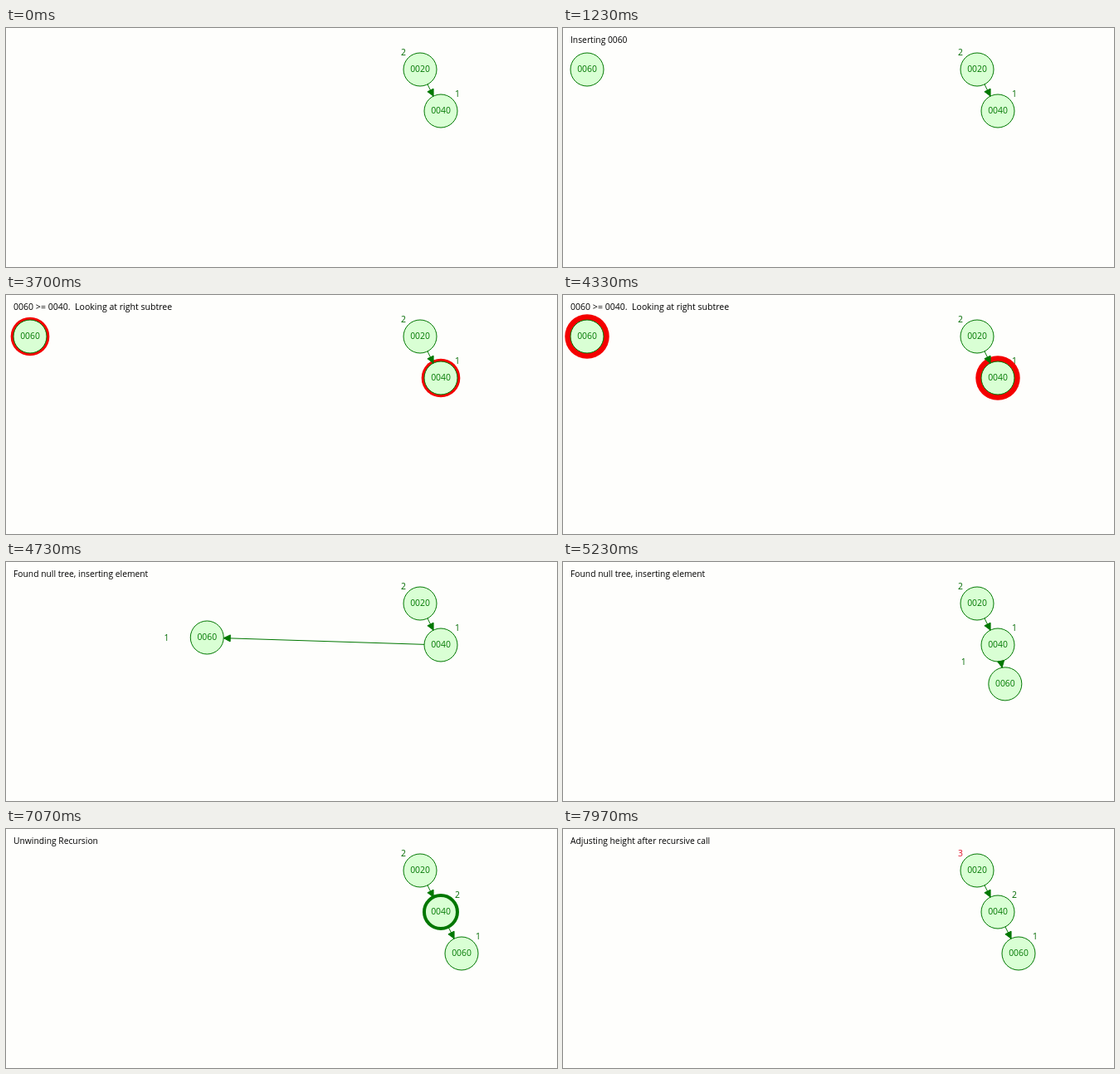
An HTML page for the animation above (8 s loop, 664x288 px).

```html
<!DOCTYPE html>
<html lang="en">
<head>
<meta charset="utf-8">
<title>AVL tree insertion</title>
<style>
  html, body { margin: 0; width: 664px; height: 288px; overflow: hidden; background: #fefefc; }
  svg { display: block; }
  text { font-family: "Open Sans", "Noto Sans", sans-serif; font-size: 10.4px; white-space: pre; }
  .node circle { fill: #d9ffd4; stroke: #007700; }
  .node .glow { fill: #f40000; stroke: none; }
  .node text { fill: #007700; text-anchor: middle; }
  .height { fill: #006a00; text-anchor: middle; }
  .height.changed { fill: #e0102a; }
  .edge { fill: #007700; stroke: #007700; }
  #ring { fill: none; stroke: #007700; stroke-width: 4; }
</style>
</head>
<body>
<svg id="stage" width="664" height="288" viewBox="0 0 664 288"></svg>
<script>
const LOOP = 8000;
const CREATED = 1200;
const START = 2000;   // first comparison
const BLOCK = 845;    // length of one animation step
const RADIUS = 20;
const PULSE = 470;

// One entry per step: message, highlighted node, ring path, changed height.
const steps = [
  { text: "0060 >= 0020.  Looking at right subtree", size: 10.55, glow: "n20" },
  { text: "0060 >= 0020.  Looking at right subtree", size: 10.55, ring: ["n20", "n40"] },
  { text: "0060 >= 0040.  Looking at right subtree", size: 10.55, glow: "n40" },
  { text: "Found null tree, inserting element" },
  { text: "Unwinding Recursion", ring: ["n60", "n40"] },
  { text: "Adjusting height after recursive call", changed: "h40" },
  { text: "Unwinding Recursion", ring: ["n40", "n20"] },
  { text: "Adjusting height after recursive call", changed: "h20" }
];
const INSERT = 3, GROW_40 = 5, GROW_20 = 7;

const spots = { n20: [499, 50], n40: [524, 100], n60: [549, 150] };
const entry = [29, 50];
const labelEntry = [80, 80];
const labelEnd = [569, 129.5];

const stage = document.getElementById("stage");

function add(tag, attrs, parent = stage) {
  const el = document.createElementNS("http://www.w3.org/2000/svg", tag);
  set(el, attrs);
  parent.append(el);
  return el;
}
function set(el, attrs) {
  for (const key in attrs) el.setAttribute(key, attrs[key]);
}
function show(el, on) {
  el.style.display = on ? "" : "none";
}
function write(el, text) {
  if (el.textContent !== text) el.textContent = text;
}
function mix(a, b, p) {
  return a.map((v, i) => v + (b[i] - v) * p);
}

function makeNode(key) {
  const group = add("g", { class: "node" });
  const glow = add("circle", { class: "glow" }, group);
  add("circle", { r: RADIUS }, group);
  add("text", { y: 3.4 }, group).textContent = "00" + key.slice(1);
  return { group, glow };
}
function makeHeight(x, y) {
  return add("text", { class: "height", x, y: y + 3.7 });
}
function makeEdge() {
  const group = add("g", { class: "edge" });
  return { group, line: add("line", {}, group), head: add("path", {}, group) };
}

function placeEdge(edge, from, to) {
  const dx = to[0] - from[0], dy = to[1] - from[1];
  const len = Math.hypot(dx, dy) || 1;
  const ux = dx / len, uy = dy / len;
  const tip = [to[0] - ux * RADIUS, to[1] - uy * RADIUS];
  const base = [tip[0] - ux * 8, tip[1] - uy * 8];
  set(edge.line, {
    x1: from[0] + ux * RADIUS, y1: from[1] + uy * RADIUS, x2: tip[0], y2: tip[1]
  });
  set(edge.head, {
    d: `M${tip}L${base[0] - uy * 4},${base[1] + ux * 4}L${base[0] + uy * 4},${base[1] - ux * 4}Z`
  });
}

const message = add("text", { x: 9, y: 18.1 });
const heights = {
  h20: makeHeight(479, 29.5),
  h40: makeHeight(544, 79.5),
  h60: makeHeight(0, 0)
};
const nodes = {};
for (const key in spots) nodes[key] = makeNode(key);
const ring = add("circle", { id: "ring", r: RADIUS });
const edges = [makeEdge(), makeEdge()];

function draw(t) {
  const index = Math.floor((t - START) / BLOCK);
  const step = steps[index] || {};
  const p = (t - START) / BLOCK - index;

  write(message, step.text || (t >= CREATED ? "Inserting 0060" : ""));
  message.style.fontSize = (step.size || 10.3) + "px";

  // The new node eases out because two moves act on it at once; its label moves linearly.
  const move = index < INSERT ? 0 : index > INSERT ? 1 : p;
  const at = { ...spots, n60: mix(entry, spots.n60, 1 - (1 - move) ** 2) };
  const labelAt = mix(labelEntry, labelEnd, move);

  // Triangle wave between 0 and 1
  const wave = Math.abs(((t + 310) / PULSE % 1) * 2 - 1);
  for (const key in nodes) {
    const lit = step.glow && (key === step.glow || key === "n60");
    set(nodes[key].group, { transform: `translate(${at[key]})` });
    set(nodes[key].glow, { r: RADIUS + 3 + 5 * wave });
    show(nodes[key].glow, lit);
  }
  show(nodes.n60.group, t >= CREATED);

  write(heights.h20, index >= GROW_20 ? "3" : "2");
  write(heights.h40, index >= GROW_40 ? "2" : "1");
  write(heights.h60, index >= INSERT ? "1" : "");
  set(heights.h60, { x: labelAt[0], y: labelAt[1] + 3.7 });
  for (const key in heights) heights[key].classList.toggle("changed", key === step.changed);

  show(ring, step.ring);
  if (step.ring) {
    const [cx, cy] = mix(spots[step.ring[0]], spots[step.ring[1]], p);
    set(ring, { cx, cy });
  }

  placeEdge(edges[0], at.n20, at.n40);
  placeEdge(edges[1], at.n40, at.n60);
  show(edges[1].group, index >= INSERT);
}

const begin = performance.now();
function tick() {
  draw((performance.now() - begin) % LOOP);
  requestAnimationFrame(tick);
}
draw(0);
requestAnimationFrame(tick);
</script>
</body>
</html>
```
